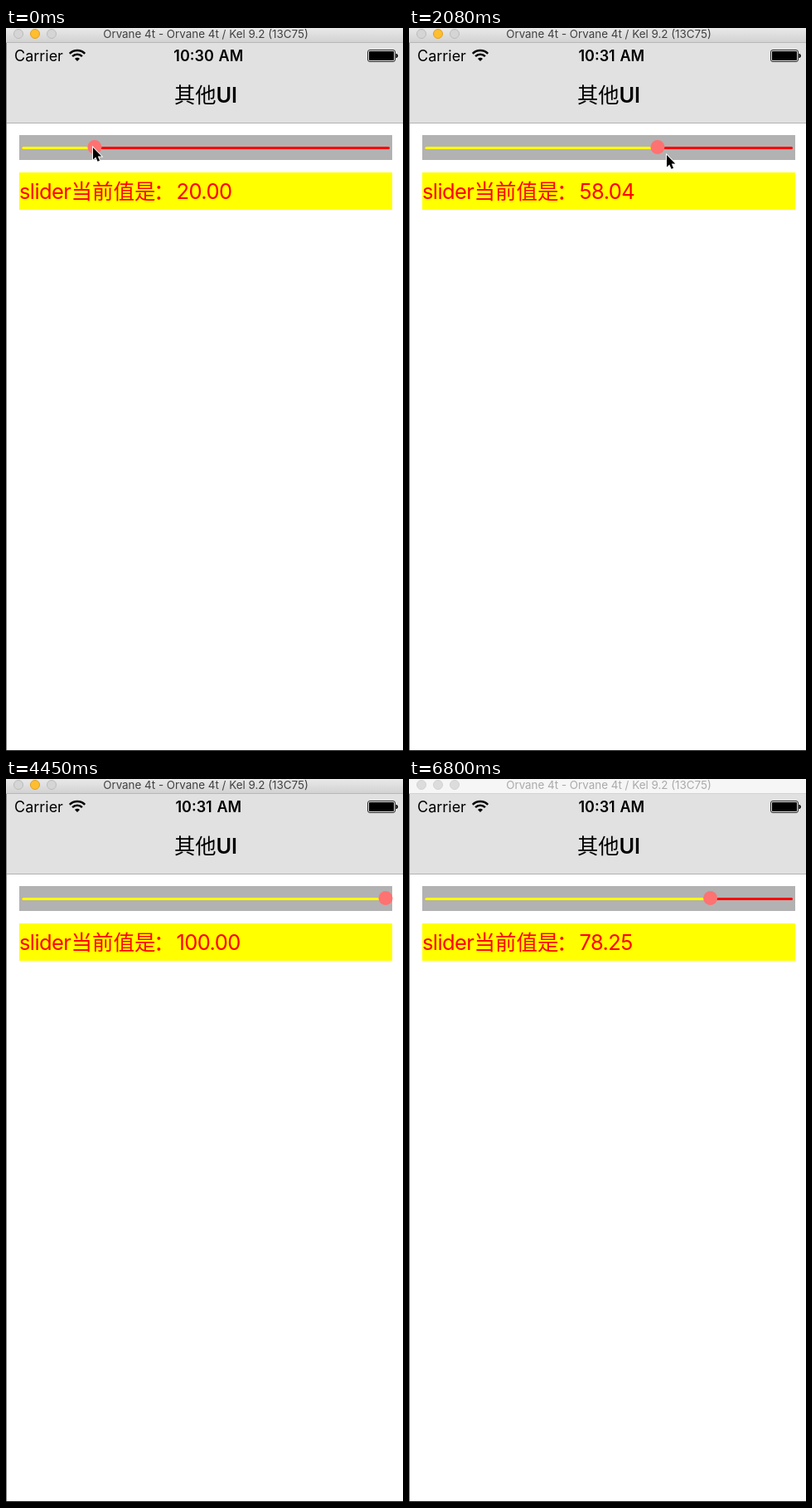
An HTML page for the animation above (6.92 s loop, 479 px wide and 871 px high).

```html
<!DOCTYPE html>
<html lang="zh">
<head>
<meta charset="utf-8">
<title>Slider</title>
<style>
html, body { margin: 0; width: 100%; height: 100%; overflow: hidden; background: #fff; }
svg { display: block; width: 479px; height: 871px; font-family: Inter, "Noto Sans CJK SC", "Noto Sans CJK", sans-serif; }
.mid { text-anchor: middle; }
.bold { font-weight: 600; }
.han { font-weight: 500; }
.label { font-size: 25.5px; fill: #f00; }
.label.han { font-weight: 350; }
.tight { letter-spacing: -.6px; }
#clock { word-spacing: 1.2px; }
#bar { fill: url(#active); }
#lights circle { fill: #d5d5d5; stroke: #bcbcbc; }
#lights .amber { fill: #ffbe2f; stroke: #dfa023; }
#caption { font-size: 13.4px; fill: #404040; }
.idle #bar { fill: #f6f6f6; }
.idle #edge { fill: #d4d4d4; }
.idle #lights circle { fill: #dcdcdc; stroke: #d2d2d2; }
.idle #caption { fill: #aaa; }
</style>
</head>
<body>
<svg id="stage" viewBox="0 0 479 871">
  <defs>
    <linearGradient id="active" x2="0" y2="1">
      <stop stop-color="#e9e9e9"/><stop offset="1" stop-color="#d2d2d2"/>
    </linearGradient>
  </defs>
  <rect width="479" height="871" fill="#fff"/>

  <!-- navigation and status bars -->
  <rect y="18" width="479" height="96" fill="#e1e1e1"/>
  <rect y="114" width="479" height="1" fill="#b2b2b2"/>
  <text x="10" y="40" font-size="18">Carrier</text>
  <path d="M76.8 30.8A13 13 0 0 1 95.2 30.8M80.1 34.1A8.3 8.3 0 0 1 91.9 34.1" fill="none" stroke="#000" stroke-width="2.5"/>
  <path d="M86 40L83 37A4.2 4.2 0 0 1 89 37Z"/>
  <text id="clock" class="mid bold" x="244.3" y="40" font-size="18"></text>
  <rect x="436.5" y="26.5" width="33" height="14" rx="2.5" fill="none" stroke="#000" stroke-width=".8"/>
  <rect x="438" y="28" width="30" height="11" rx="1"/>
  <path d="M471 31A3 3 0 0 1 471 36Z" stroke="#000"/>
  <text class="mid bold" x="241" y="90" font-size="25.3"><tspan class="han">其他</tspan>UI</text>

  <!-- slider and its label -->
  <rect x="16" y="129" width="450" height="30" fill="#b2b2b2"/>
  <rect x="19" y="143" width="444" height="3" rx="1.5" fill="#f00"/>
  <rect id="filled" x="19" y="143" height="3" rx="1.5" fill="#ff0"/>
  <circle id="thumb" cy="143.5" r="8.5" fill="#ff7272"/>
  <rect x="16" y="174" width="450" height="45" fill="#ff0"/>
  <text class="label tight" x="16" y="206">slider</text>
  <text class="label han" x="78.5" y="206">当前值是<tspan dx="-2.5">：</tspan></text>
  <text id="value" class="label tight" x="205.5" y="206"></text>

  <!-- window frame -->
  <rect y="18" width="1" height="853" fill="#858585"/>
  <rect y="870" width="479" height="1" fill="#1c1c1c"/>
  <rect id="bar" width="479" height="17"/>
  <rect id="edge" y="17" width="479" height="1" fill="#b8b8b8"/>
  <g id="lights">
    <circle cx="15" cy="7" r="5.5"/>
    <circle class="amber" cx="35" cy="7" r="5.5"/>
    <circle cx="55" cy="7" r="5.5"/>
  </g>
  <text id="caption" class="mid" x="241" y="12">Orvane 4t - Orvane 4t / Kel 9.2 (13C75)</text>

  <path id="cursor" d="M0 0V14.5L3.3 11.4L5.6 16.8L8 15.8L5.8 10.6H10.3Z" stroke="#fff" stroke-width="1.8" paint-order="stroke"/>
</svg>
<script>
const LOOP = 6920;
const STEP = 148;
const LAG = 35;     // the thumb trails the pointer

// each move: start, end, slider value reached
const drags = [
  [0, 700, 40.85], [1190, 1770, 58.04], [1925, 2300, 74.65],
  [3062, 3400, 0], [3570, 4430, 100], [5040, 5912, 78.25]
];
// each move: start, end, pointer offset from the thumb, pointer y
const hand = [
  [300, 740, -1, 146], [1930, 2070, 1, 153], [2230, 2370, -6, 153],
  [2830, 3110, 2, 147], [3110, 3400, -20, 131], [3710, 4290, -4, 146],
  [4300, 4430, 60, 150], [4740, 4960, -4, 148], [5040, 5470, -2, 146],
  [5480, 5920, -7, 156], [5920, 6060, 105, 738], [6070, 6200, 160, 1300]
];

const $ = id => document.getElementById(id);
const ease = u => (1 - Math.cos(Math.PI * Math.min(1, Math.max(0, u)))) / 2;

// carries the starting values through every move up to time t
const follow = (moves, from, t) => moves.reduce((now, [start, end, ...goal]) => {
  const k = ease((t - start) / (end - start));
  return now.map((v, i) => v + (goal[i] - v) * k);
}, from);

const thumbX = t => 24 + 4.34 * follow(drags, [19.1], t)[0];

function draw(time) {
  const t = Math.floor((time + 8) / STEP) * STEP;
  const x = thumbX(t);
  const [offset, y] = follow(hand, [-2, 144], t);
  const released = drags.findLast(([, end]) => end <= t);
  $("thumb").setAttribute("cx", x);
  $("filled").setAttribute("width", x - 19);
  $("cursor").setAttribute("transform", `translate(${Math.round(thumbX(t + LAG) + offset)} ${Math.round(y)})`);
  $("value").textContent = (released ? released[2] : 20).toFixed(2);
  $("clock").textContent = time < 1330 ? "10:30 AM" : "10:31 AM";
  $("stage").classList.toggle("idle", time >= 6800);
}

const start = performance.now();
function tick() {
  draw((performance.now() - start) % LOOP);
  requestAnimationFrame(tick);
}
tick();
</script>
</body>
</html>
```
